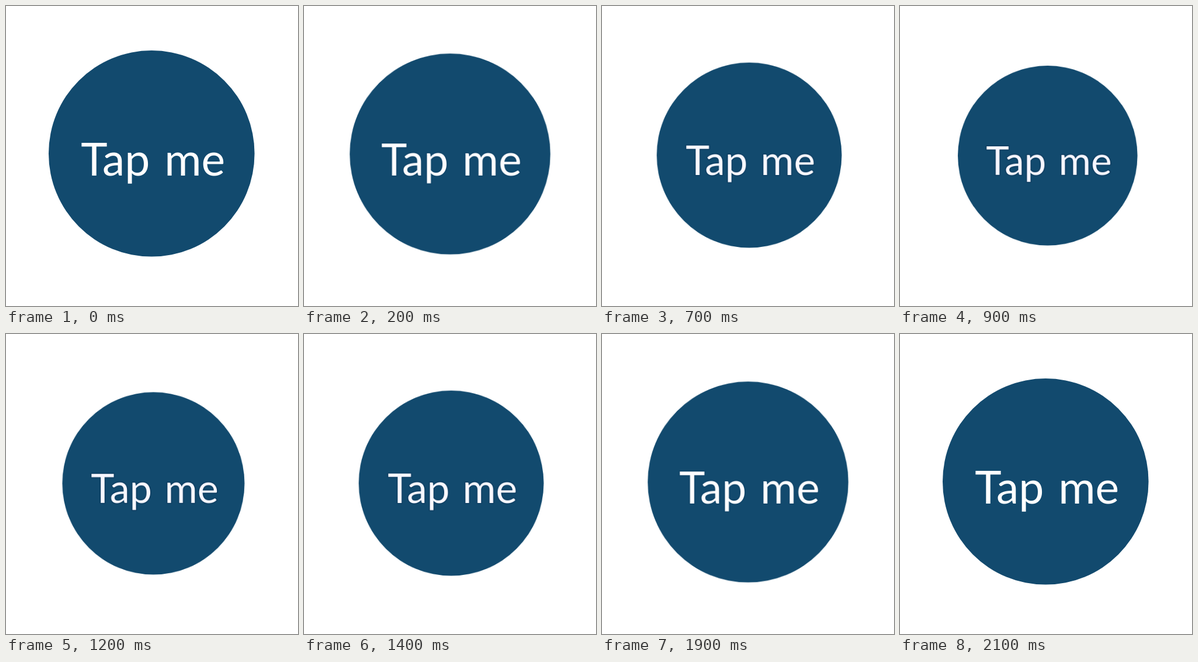
Recreate the animation shown at these times as an HTML page. Size 500x513 px, loop 2200 ms.

```html
<!DOCTYPE html>
<html lang="en">
<head>
<meta charset="utf-8">
<title>Tap me</title>
<style>
  html, body { margin: 0; width: 100%; height: 100%; overflow: hidden; background: #fff; }
  svg { display: block; }
  #button { transform-origin: 0 0; }
  circle { fill: #124a6e; }
  text {
    font: 77px Lato, "Open Sans", sans-serif;
    word-spacing: 5px;
    text-anchor: middle;
    fill: #fff;
    stroke: #0b3154;
    stroke-width: 4px;
    stroke-opacity: 0;
    stroke-linejoin: round;
    paint-order: stroke;
  }
</style>
</head>
<body>
<svg width="500" height="513" viewBox="0 0 500 513">
  <g id="button">
    <circle r="176.3"/>
    <text id="label" x="2.4" y="37.7">Tap me</text>
  </g>
</svg>
<script>
  const LOOP = 2200;
  const radii = [176.3, 174, 171.8, 169.3, 166.7, 164, 161.1, 158.4, 156, 153.8];

  // [start in ms, press level]: down, hold, slow release, back up
  const steps = [];
  for (let i = 0; i <= 9; i++) steps.push([i * 100, i]);
  steps.push([1200, 8]);
  for (let i = 7; i >= 0; i--) steps.push([2100 - i * 100, 7 - (7 - i)]);
  steps.sort((a, b) => a[0] - b[0]);
  for (const s of steps) if (s[0] >= 1400) s[1] = (2100 - s[0]) / 100;
  steps.push([LOOP, 0]);

  function play(el, pose) {
    const frames = steps.map(([ms, level]) => ({
      offset: ms / LOOP, easing: "step-end", ...pose(level)
    }));
    el.animate(frames, { duration: LOOP, iterations: Infinity });
  }

  play(document.getElementById("button"), level => {
    const shift = 3.5 * level / 9;
    const scale = radii[level] / radii[0];
    return { transform: `translate(${249.3 + shift}px, ${252.3 + shift}px) scale(${scale})` };
  });

  play(document.getElementById("label"), level => ({
    strokeOpacity: 0.5 * level / 9,
    fill: `rgb(${255 - level}, ${255 - level}, 255)`
  }));
</script>
</body>
</html>
```
